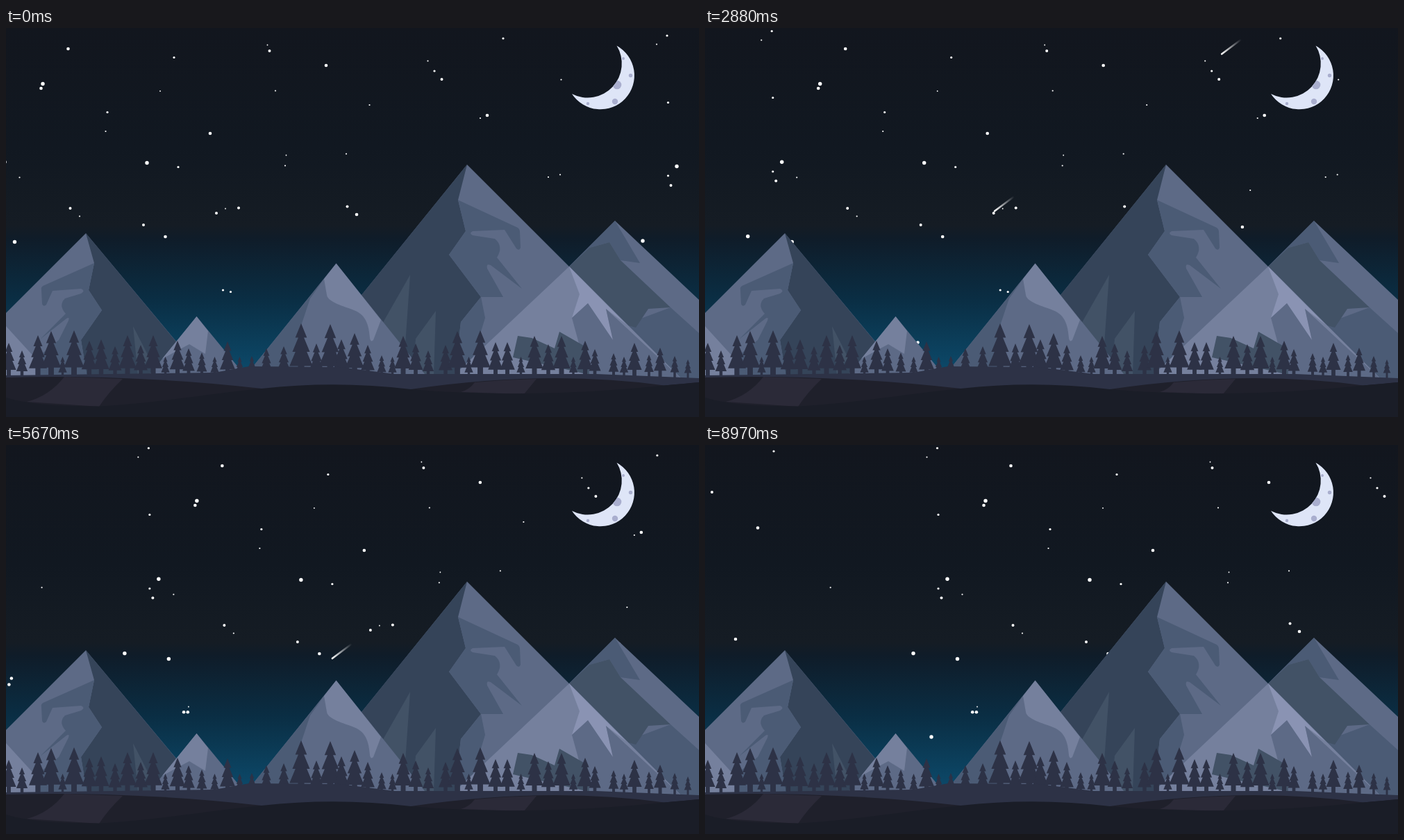
Write an HTML page with a canvas that moves like this. It is 998 px wide and 561 px high and loops after 9000 ms.

```html
<!DOCTYPE html>
<html lang="en">
<head>
<meta charset="utf-8">
<title>Night mountains</title>
<style>
html, body { margin: 0; width: 100%; height: 100%; overflow: hidden; background: #12161e; }
canvas { display: block; }
</style>
</head>
<body>
<canvas id="stage" width="998" height="561"></canvas>
<script>
const W = 998, H = 561, BASE = 510, LOOP = 9000, STEP = 30;
const DRIFT = 0.03913; // star speed, px per ms
const ctx = document.getElementById('stage').getContext('2d');

const C = {
  shade: '#354459', rock: '#425266', slate: '#4b5b75', lit: '#5d6a86',
  pale: '#75809d', bright: '#8a93b3', tree: '#2d3246',
  hill: '#1f202b', patch: '#2b2a38', front: '#1a1d27'
};

// Stars by radius, as x, y pairs at time zero; negative x enters later.
const stars = {
  2.7: [53,80.5, 203,194.5, -2,193.3, 12.5,308.5, 966,199.5, 917,307, -51,300.5, -25,421],
  2.3: [89.5,30, 50.5,87, 461,54, 693,126, 294,152, 229.5,301, 505,269, 34.2,385.3,
    39.9,385.3, 193.8,453.5, 661.2,287, -214,336.5, -217.5,345.5, -275,119.5, -307,280],
  2: [379.5,33, 627.5,74, 92.5,260, 198,284, 303,267, 335,259.5, 491.5,257.5,
    957.5,227, -10.5,220.5, -341,68],
  1.6: [146,121.5, 242,42.5, 617,62, 716,15, 952,11, 953.5,107.5, 248,200.5,
    312.5,378, 323.5,380.5, 953.5,213, -15,100.5, -15,207, -252,9, -16.5,4.5],
  1.1: [143.5,149, 388,90.5, 523.5,111, 607.5,47.5, 937,23.5, 402,198.5, 490,181.5,
    106,271.5, 781,215, 798,211.5, -31.5,17.5, -170.3,205.5, 683,130, 799.5,74.5,
    19.5,215.5, 672.5,234],
  0.9: [222,91, 376.5,24.5, 403.5,183.5, 316,260.5, 41,377.5]
};

// Head position at a given time, with velocity in px per ms.
const meteors = [
  { t: 2070, x: 518.5, y: 186.5, vx: -0.1252, vy: 0.0957 },
  { t: 3660, x: 667.5, y: 113, vx: -0.0983, vy: 0.0969 }
];

// Tree tops as x, y pairs; wide gaps get a small tree between.
const trees = [
  4,454, 23,465, 46,443, 65,437, 98,436, 120,451, 137,449, 157,459, 175,443, 194,457, 212,443,
  247,451, 263,462, 282,468, 319,452, 354,473, 375,462, 400,459, 425,426, 447,455, 467,427,
  483,449, 502,440, 521,457, 541,472, 572,444, 590,455, 608,465, 633,457, 650,437, 683,436,
  705,453, 722,453, 761,444, 781,456, 800,444, 834,451, 848,463, 875,469, 905,454, 926,471,
  942,461, 963,473, 982,478
];

function poly(g, color, ...p) {
  g.beginPath();
  for (let i = 0; i < p.length; i += 2) g.lineTo(p[i], p[i + 1]);
  g.closePath();
  g.fillStyle = color;
  g.fill();
}

function peak(g, color, x, y, left, right) {
  const h = BASE - y;
  poly(g, color, x, y, x + right * h, BASE, x - left * h, BASE);
}

function shape(g, color, d) {
  g.fillStyle = color;
  g.fill(new Path2D(d));
}

function dot(g, x, y, r) {
  g.beginPath();
  g.arc(x, y, r, 0, Math.PI * 2);
  g.fill();
}

function layer(paint) {
  const c = document.createElement('canvas');
  c.width = W;
  c.height = H;
  paint(c.getContext('2d'));
  return c;
}

function paintSky(g) {
  const grad = g.createLinearGradient(0, 0, 0, 490);
  grad.addColorStop(0, '#12161e');
  grad.addColorStop(0.35, '#111821');
  grad.addColorStop(0.58, '#151c24');
  grad.addColorStop(0.62, '#0f1c29');
  grad.addColorStop(0.8, '#0a2e44');
  grad.addColorStop(1, '#0c4868');
  g.fillStyle = grad;
  g.fillRect(0, 0, W, H);
}

function paintMoon(g) {
  g.save();
  const moon = new Path2D('M879.5 25.5A48.9 48.9 0 1 1 815 95A49.2 49.2 0 0 0 879.5 25.5Z');
  g.fillStyle = '#dee5f7';
  g.fill(moon);
  g.clip(moon);
  g.fillStyle = '#a9aece';
  dot(g, 889, 44, 2);
  dot(g, 899.5, 68.5, 2.7);
  dot(g, 880, 82, 6.3);
  dot(g, 877, 106, 4.2);
  dot(g, 838, 109, 2.2);
  g.restore();
}

function paintFarRight(g) {
  peak(g, C.lit, 877, 278, 1, 1.061);
  poly(g, C.slate, 877,278, 913,339, 885,335, 869,309, 840,317, 790,365);
  poly(g, C.slate, 957,403, W,440, W,BASE, 900,BASE, 893,427);
  poly(g, C.rock, 840,317, 869,309, 885,335, 957,403, 925,405, 907,432, 790,400, 790,364);
}

function paintTall(g) {
  peak(g, C.lit, 664, 197, 0.808, 1);
  poly(g, C.shade, 664,197, 651,248, 662,293, 638,327, 684,388, 655,424, 645,BASE, 411,BASE);
  shape(g, C.slate, 'M651 248L737 288Q740 290 740 293L741 317Q739 322 735 318L718 291L672 293' +
    'Q666 296 672 299L704 304Q717 315 707 331L743 376L698 342Q691 339 693 347L716 388H684L638 327L662 293Z');
  poly(g, C.slate, 684,388, 655,424, 645,BASE, 662,BASE, 690,418);
  poly(g, C.rock, 582,356, 541,428, 562,500, 572,500);
  poly(g, C.rock, 619,408, 590,448, 585,500, 616,500);
}

function paintLowRight(g) {
  peak(g, C.pale, 811, 344, 1.06, 1);
  poly(g, C.bright, 811,344, 893,427, 864,405, 874,450, 838,397, 815,418, 826,384);
  poly(g, C.lit, 838,397, 874,450, 864,405, 977,BASE, 840,BASE, 815,418);
  poly(g, C.rock, 737,444, 730,475, 840,500, 837,461, 797,438, 790,462, 757,447);
}

function paintLeft(g) {
  peak(g, C.lit, 115, 296, 1, 0.834);
  poly(g, C.shade, 115,296, 127,339, 119,378, 138,407, 108,450, 118,BASE, 293,BASE);
  shape(g, C.slate, 'M127 339L53 372Q50 374 51 378L52 398Q54 403 58 399L67 379L108 376' +
    'Q115 379 108 383L85 390Q75 400 86 412L49 449L87 419Q92 416 90 422L76 450L45 475L50 510H118L108 450L138 407L119 378Z');
  poly(g, C.pale, 0,430, 42,476, 42,BASE, 0,BASE);
  poly(g, C.rock, 183,430, 206,475, 190,500);
}

function paintSmallAndMiddle(g) {
  peak(g, C.lit, 274.5, 416, 0.81, 0.82);
  poly(g, C.pale, 274.5,416, 291,437, 287,470, 264,456, 225,477);
  peak(g, C.lit, 475.5, 339.5, 0.805, 0.8);
  poly(g, C.slate, 458,362, 438,390, 424,432, 424,BASE, 338,BASE);
  shape(g, C.pale, 'M475.5 339.5L540 421L529 450Q525 454 524 447C522 420 514 411 496 405C478 399 463 393 462 385L458 362Z');
}

function paintTree(g, x, top) {
  const h = 502 - top;
  const tree = new Path2D();
  // three flared tiers over a trunk
  const tier = (from, to, w) => {
    tree.moveTo(x, top + from * h);
    tree.lineTo(x + w * h, top + to * h);
    tree.lineTo(x - w * h, top + to * h);
    tree.closePath();
  };
  for (let k = 0; k < 3; k++) tier(k * 0.14, 0.27 * (k + 1), 0.11 + k * 0.055);
  tree.rect(x - 0.06 * h, top + 0.75 * h, 0.12 * h, 0.4 * h);
  g.fillStyle = C.tree;
  g.fill(tree);
}

function paintGround(g) {
  for (let i = 0; i < trees.length; i += 2) {
    const x = trees[i], next = trees[i + 2];
    paintTree(g, x, trees[i + 1]);
    if (next - x > 27) paintTree(g, (x + next) / 2, 474);
  }
  poly(g, C.tree, 0,501, 300,497, 350,488, 480,489, 560,499, 850,499, W,505, W,H, 0,H);
  shape(g, C.hill, 'M0 504Q180 499 368 520V561H0Z');
  shape(g, C.hill, 'M583 521Q780 492 948 515.5Q975 513 998 511V561H583Z');
  shape(g, C.patch, 'M84 503L168 506Q148 525 134 546L30 539Q62 531 84 503Z');
  shape(g, C.patch, 'M675 511Q720 507 764 506L746 528L655 525Q668 521 675 511Z');
  shape(g, C.front, 'M0 533Q40 546 135 545.5C220 541 300 526 368 520Q475 508 583 521Q660 528 750 527' +
    'Q850 526 948 515.5Q975 513 998 511V561H0Z');
}

function drawStars(t) {
  ctx.fillStyle = '#fff';
  for (const r in stars) {
    const p = stars[r];
    for (let i = 0; i < p.length; i += 2) dot(ctx, p[i] + DRIFT * t, p[i + 1], +r);
  }
}

function drawMeteor(m, t) {
  const x = m.x + m.vx * (t - m.t), y = m.y + m.vy * (t - m.t);
  const tx = x + 28, ty = y - 21;
  const grad = ctx.createLinearGradient(x, y, tx, ty);
  grad.addColorStop(0, '#fff');
  grad.addColorStop(1, 'rgba(255,255,255,0)');
  ctx.strokeStyle = grad;
  ctx.lineWidth = 2.6;
  ctx.lineCap = 'round';
  ctx.beginPath();
  ctx.moveTo(x, y);
  ctx.lineTo(tx, ty);
  ctx.stroke();
}

const sky = layer(paintSky);
const land = layer(g => {
  paintMoon(g);
  paintFarRight(g);
  paintTall(g);
  paintLowRight(g);
  paintLeft(g);
  paintSmallAndMiddle(g);
  paintGround(g);
});

function draw(now) {
  const t = Math.floor((now % LOOP) / STEP) * STEP;
  ctx.drawImage(sky, 0, 0);
  drawStars(t);
  meteors.forEach(m => drawMeteor(m, t));
  ctx.drawImage(land, 0, 0);
}

const start = performance.now();
function loop() {
  draw(performance.now() - start);
  requestAnimationFrame(loop);
}
loop();
</script>
</body>
</html>
```
